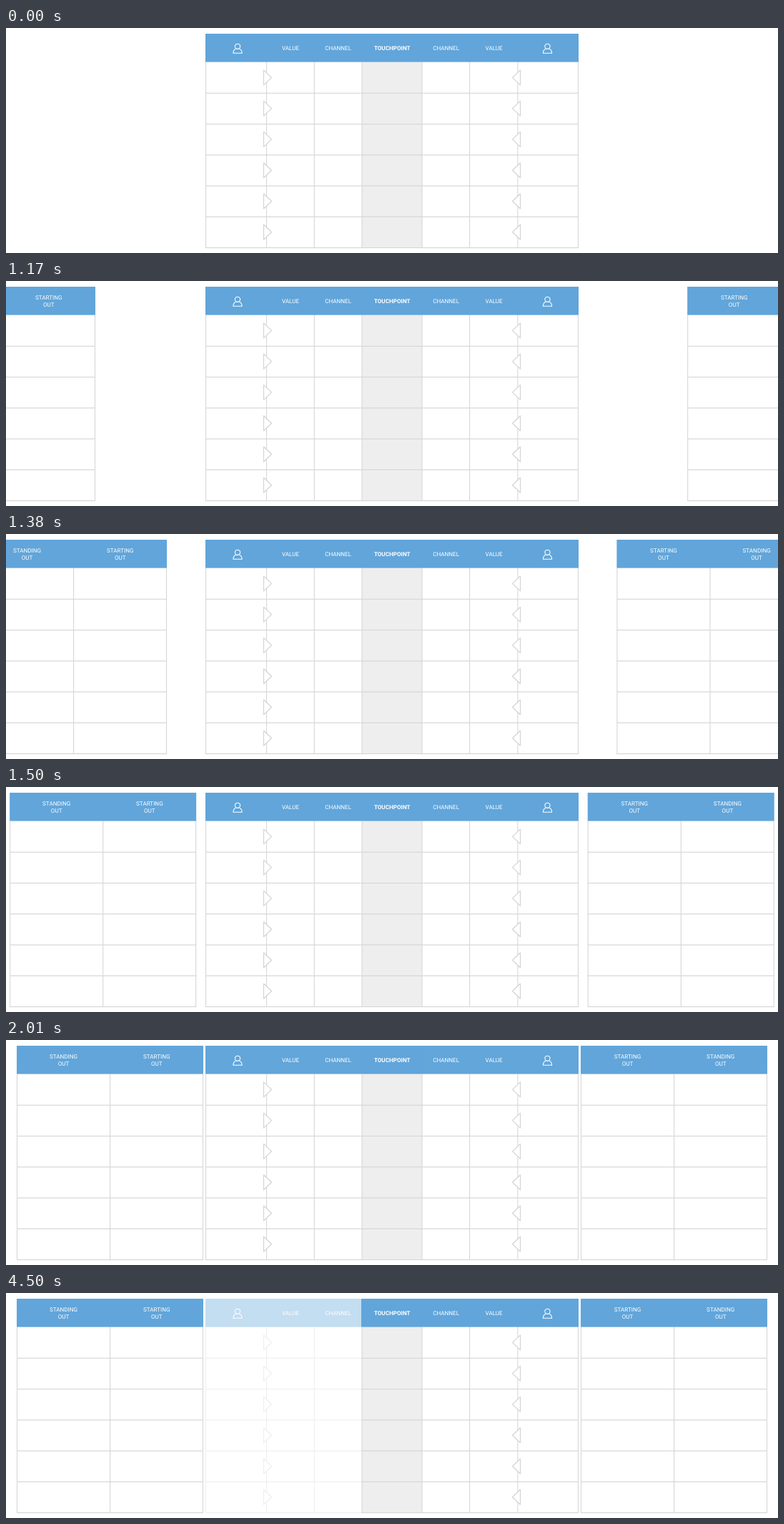
These frames come from a looping animation (1080x315 px, 4.53 s). An HTML page with a canvas:

```html
<!DOCTYPE html>
<html lang="en">
<head>
<meta charset="utf-8">
<title>Touchpoint table</title>
<style>
  html, body { margin: 0; width: 100%; height: 100%; overflow: hidden; background: #fff; }
  canvas { display: block; width: 1080px; height: 315px; }
</style>
</head>
<body>
<canvas id="stage" width="1080" height="315"></canvas>
<script>
const ctx = document.getElementById('stage').getContext('2d');
const LOOP = 4530, STEP = 30;
const BLUE = '#61a5da', LINE = '#d7d7d7', GRAY = '#eeeeee';
const TOP = 8, BODY = 47.6, BOTTOM = 307.6, ROWS = 6;
const ROW = (BOTTOM - 48) / ROWS;
const PANEL = 261;

// time, distance left to travel, speed
const SLIDE = [
  [930, 269, -0.47],
  [1170, 151, -0.505],
  [1380, 51, -0.43],
  [1650, -9.5, 0],
  [1920, 0, 0]
];

function slideOffset(t) {
  const i = SLIDE.findIndex(key => key[0] > t);
  if (i < 0) return 0;
  const [t0, p0, v0] = SLIDE[i - 1], [t1, p1, v1] = SLIDE[i];
  const d = t1 - t0, u = (t - t0) / d, w = 1 - u;
  return w * w * (1 + 2 * u) * p0 + u * w * w * d * v0 +
         u * u * (3 - 2 * u) * p1 - u * u * w * d * v1;
}

function fadeAmount(t) {
  const u = Math.min(1, Math.max(0, (t - 1970) / 610));
  return 0.62 * (1 - Math.cos(Math.PI * u)) / 2;
}

function rect(x, y, w, h, color) {
  ctx.fillStyle = color;
  ctx.fillRect(x, y, w, h);
}

function label(text, x, y, weight = 400) {
  ctx.font = `${weight} 8.1px Roboto, sans-serif`;
  ctx.fillStyle = '#fff';
  ctx.fillText(text, x, y);
}

function grid(x, width, columns) {
  for (let i = 1; i <= ROWS; i++) rect(x, 48 + i * ROW - 0.6, width, 1.2, LINE);
  for (const c of columns) rect(c - 0.55, BODY, 1.1, BOTTOM - BODY + 0.5, LINE);
  rect(x, TOP, width, BODY - TOP, BLUE);
}

function person(x) {
  ctx.strokeStyle = '#fff';
  ctx.lineWidth = 1.1;
  ctx.beginPath();
  ctx.arc(x, 25.8, 3.6, 0, Math.PI * 2);
  ctx.moveTo(x - 2.6, 29.2);
  ctx.bezierCurveTo(x - 5, 30.2, x - 6.1, 32, x - 6.1, 35.2);
  ctx.lineTo(x + 6.1, 35.2);
  ctx.bezierCurveTo(x + 6.1, 32, x + 5, 30.2, x + 2.6, 29.2);
  ctx.stroke();
}

function arrow(x, y, dir) {
  ctx.beginPath();
  ctx.moveTo(x, y - 10.5);
  ctx.lineTo(x + dir * 11, y);
  ctx.lineTo(x, y + 10.5);
  ctx.closePath();
  ctx.fillStyle = '#fff';
  ctx.fill();
  ctx.strokeStyle = '#d2d2d2';
  ctx.lineWidth = 1.1;
  ctx.lineJoin = 'round';
  ctx.stroke();
}

function drawCenter() {
  rect(498, BODY, 84, BOTTOM - BODY, GRAY);
  grid(279, 522, [279.5, 364.5, 431.3, 498, 582, 648.6, 715.9, 800.5]);
  for (let i = 0; i < ROWS; i++) {
    const y = 48 + (i + 0.5) * ROW - 0.2;
    arrow(360.5, y, 1);
    arrow(719.5, y, -1);
  }
  person(324);
  person(757.5);
  label('VALUE', 398, 31.3);
  label('CHANNEL', 464.6, 31.3);
  label('TOUCHPOINT', 540.2, 31.3, 700);
  label('CHANNEL', 615.6, 31.3);
  label('VALUE', 682.6, 31.3);
}

function drawPanel(x, titles) {
  rect(x, TOP, PANEL, BOTTOM - TOP, '#fff');
  grid(x, PANEL, [x + 0.5, x + 130.6, x + PANEL - 0.5]);
  titles.forEach((title, i) => {
    const center = x + 65.5 + i * 130.2;
    label(title, center, 26.3);
    label('OUT', center, 36.3);
  });
}

function draw(t) {
  rect(0, 0, 1080, 315, '#fff');
  ctx.textAlign = 'center';
  ctx.textRendering = 'geometricPrecision';
  drawCenter();

  const veil = `rgba(255,255,255,${fadeAmount(t)})`;
  rect(278, 7, 219, 302, veil);
  if (t < 4500) rect(583, 7, 219, 302, veil);

  if (t < 930) return;
  const offset = slideOffset(t);
  drawPanel(15 - offset, ['STANDING', 'STARTING']);
  drawPanel(804 + offset * 0.988, ['STARTING', 'STANDING']);
}

const start = performance.now();
function tick() {
  const t = (performance.now() - start) % LOOP;
  draw(Math.floor(t / STEP) * STEP);
  requestAnimationFrame(tick);
}
tick();
</script>
</body>
</html>
```
